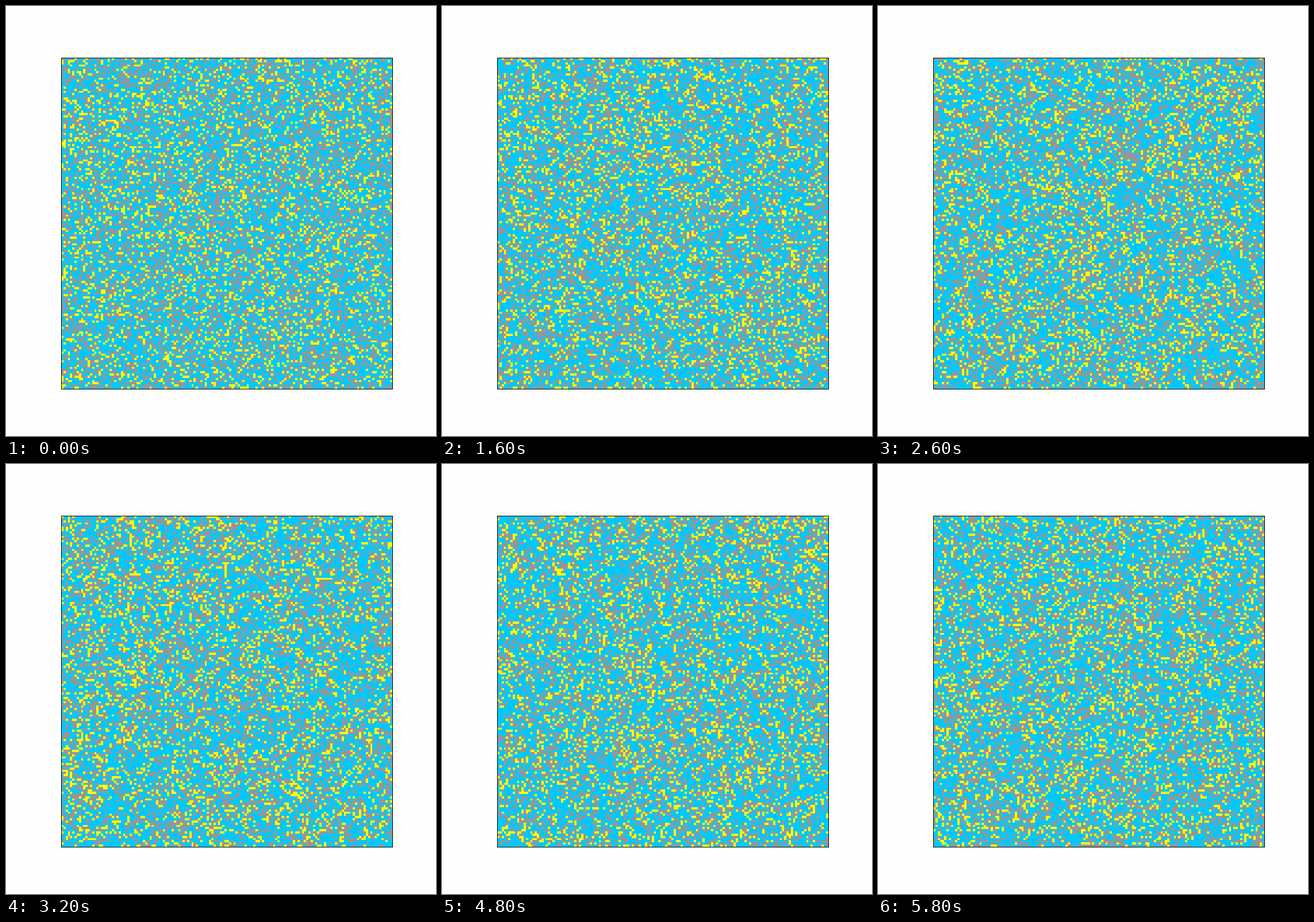
Recreate the animation shown at these times as an HTML page with a canvas. Size 748x748 px, loop 6 s.

```html
<!DOCTYPE html>
<html lang="en">
<head>
<meta charset="utf-8">
<title>Excitable lattice</title>
<style>
html, body { margin: 0; width: 100%; height: 100%; overflow: hidden; background: #fefefe; }
canvas { display: block; }
</style>
</head>
<body>
<canvas id="stage" width="748" height="748"></canvas>
<script>
const LOOP = 6000, STEP = 200, GENERATIONS = 29;
const N = 150, LEFT = 96, TOP = 90, SIZE = 576;
const REST = 0, EXCITED = 1, TIRED = 2;
const COLORS = [[0, 200, 255], [255, 255, 0], [150, 150, 150]];
const EXCITED_SHARE = 0.158, TIRED_SHARE = 0.32;

const ctx = document.getElementById('stage').getContext('2d');
ctx.imageSmoothingEnabled = false;

function randomizer(seed) {
  return () => {
    seed = (seed + 0x6D2B79F5) | 0;
    let t = Math.imul(seed ^ (seed >>> 15), 1 | seed);
    t = (t + Math.imul(t ^ (t >>> 7), 61 | t)) ^ t;
    return ((t ^ (t >>> 14)) >>> 0) / 4294967296;
  };
}
const rand = randomizer(150);

function firstGrid() {
  return Uint8Array.from({ length: N * N }, () => {
    const r = rand();
    if (r < EXCITED_SHARE) return EXCITED;
    return r < EXCITED_SHARE + TIRED_SHARE ? TIRED : REST;
  });
}

function excitedAround(grid, x, y) {
  let count = 0;
  for (let dy = -1; dy <= 1; dy++) {
    const row = (y + dy + N) % N * N;
    for (let dx = -1; dx <= 1; dx++) {
      if (grid[row + (x + dx + N) % N] === EXCITED) count++;
    }
  }
  return count;
}

// Resting cells catch the excitation of their neighbours, then tire and recover.
function nextGrid(grid) {
  const chance = new Float32Array(N * N);
  let total = 0;
  for (let i = 0; i < N * N; i++) {
    if (grid[i] !== REST) continue;
    chance[i] = 1 - 0.74 ** (excitedAround(grid, i % N, Math.floor(i / N)) + 0.15);
    total += chance[i];
  }
  const scale = EXCITED_SHARE * N * N / total;
  const recovery = EXCITED_SHARE / TIRED_SHARE;
  return grid.map((state, i) => {
    const r = rand();
    if (state === EXCITED) return TIRED;
    if (state === TIRED) return r < recovery ? REST : TIRED;
    return r < chance[i] * scale ? EXCITED : REST;
  });
}

function paint(grid) {
  const tile = document.createElement('canvas');
  tile.width = tile.height = N;
  const pen = tile.getContext('2d');
  const image = pen.createImageData(N, N);
  grid.forEach((state, i) => image.data.set([...COLORS[state], 255], i * 4));
  pen.putImageData(image, 0, 0);
  return tile;
}

const tiles = [];
let grid = firstGrid();
for (let i = 0; i < GENERATIONS; i++) {
  tiles.push(paint(grid));
  grid = nextGrid(grid);
}

function draw(time) {
  const index = Math.max(0, Math.floor(time / STEP) - 1);
  ctx.fillStyle = '#fefefe';
  ctx.fillRect(0, 0, 748, 748);
  ctx.drawImage(tiles[index], LEFT, TOP, SIZE, SIZE);
  ctx.strokeStyle = '#000';
  ctx.lineWidth = 1;
  ctx.strokeRect(LEFT + 0.5, TOP + 0.5, SIZE, SIZE);
}

const start = performance.now();
function tick() {
  draw((performance.now() - start) % LOOP);
  requestAnimationFrame(tick);
}
tick();
</script>
</body>
</html>
```
